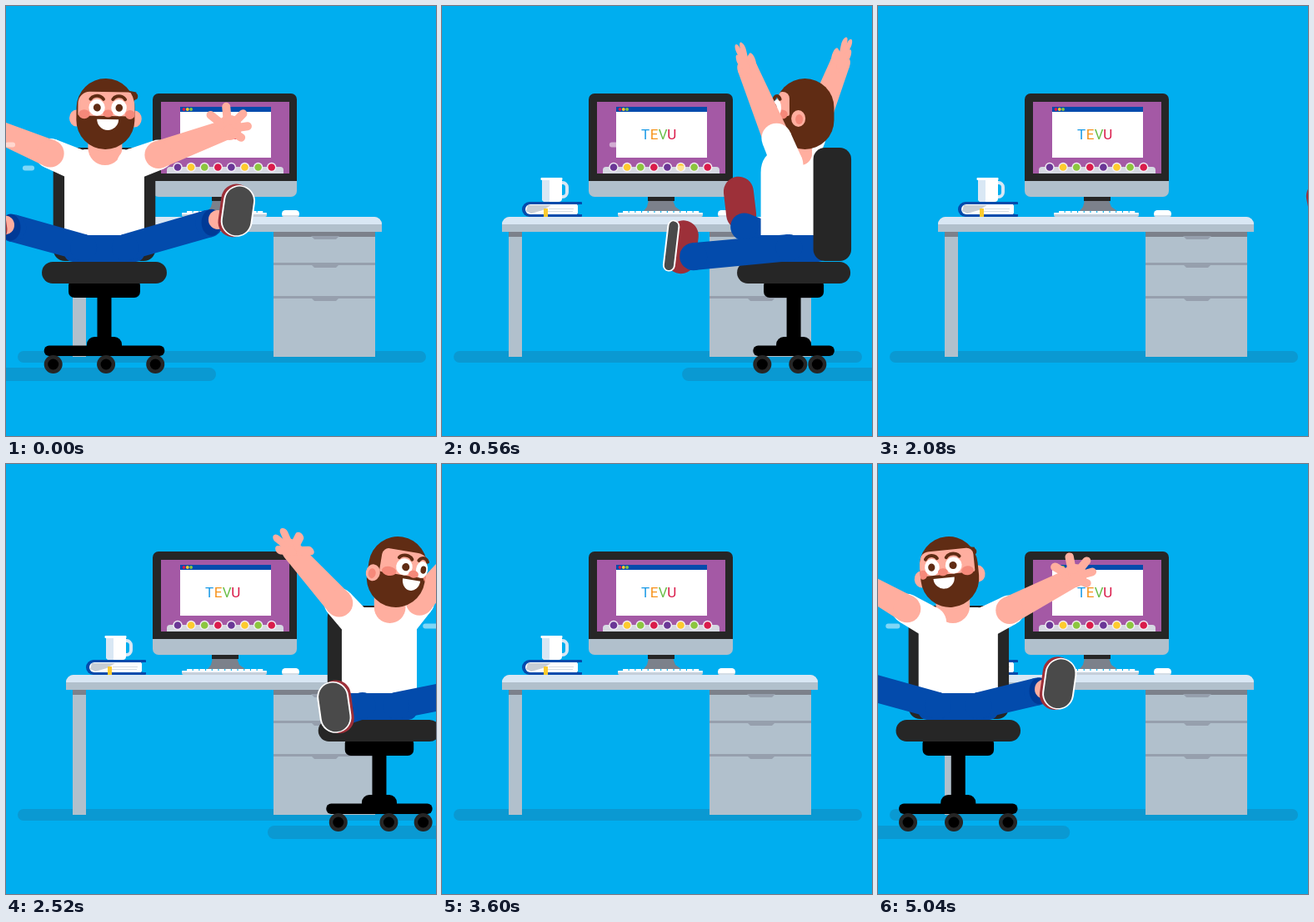
An HTML page with a canvas for the animation above (5080 ms loop, 516 by 516 pixels).

```html
<!DOCTYPE html>
<html lang="en">
<head>
<meta charset="utf-8">
<title>Spinning chair</title>
<style>
html, body { margin: 0; width: 100%; height: 100%; overflow: hidden; background: #00aeef; }
canvas { display: block; width: 100vw; height: 100vh; }
</style>
</head>
<body>
<canvas id="stage" width="516" height="516"></canvas>
<script>
const ctx = document.getElementById('stage').getContext('2d');
const LOOP = 5080, STEP = 40, SIZE = 516;
const SPEED = 0.543;   // px per ms
const SPIN = 0.45;     // degrees per ms
const RAD = Math.PI / 180;
const C = {
  sky: '#00aeef', shade: '#0a99d2', dark: '#262626', grey: '#b1c0cc', light: '#d9e7f4',
  line: '#969fad', under: '#7c818b', blue: '#034bac', navy: '#003a96', skin: '#ffae9f',
  pink: '#f5897a', hair: '#602c14', red: '#9d3039', sole: '#4a4a4a', purple: '#a459a5'
};
const clamp = (v, lo = 0, hi = 1) => Math.min(hi, Math.max(lo, v));
const mix = (p, q, k) => [p[0] + (q[0] - p[0]) * k, p[1] + (q[1] - p[1]) * k];

function box(x, y, w, h, color, r = 0) {
  ctx.fillStyle = color;
  ctx.beginPath();
  ctx.roundRect(x, y, w, h, r);
  ctx.fill();
}
function oval(x, y, rx, ry, color) {
  ctx.fillStyle = color;
  ctx.beginPath();
  ctx.ellipse(x, y, rx, ry, 0, 0, 7);
  ctx.fill();
}
const dot = (x, y, r, color) => oval(x, y, r, r, color);
function poly(points, color) {
  ctx.fillStyle = color;
  ctx.beginPath();
  points.forEach(p => ctx.lineTo(p[0], p[1]));
  ctx.fill();
}
function stroke(p, q, width, color) {
  ctx.strokeStyle = color;
  ctx.lineWidth = width;
  ctx.lineCap = 'round';
  ctx.beginPath();
  ctx.moveTo(p[0], p[1]);
  ctx.lineTo(q[0], q[1]);
  ctx.stroke();
}
// Limb with round ends of different radii
function tube(p, q, r1, r2, color) {
  const n = Math.atan2(q[1] - p[1], q[0] - p[0]) + Math.PI / 2;
  const at = (o, r) => [o[0] + Math.cos(n) * r, o[1] + Math.sin(n) * r];
  poly([at(p, r1), at(q, r2), at(q, -r2), at(p, -r1)], color);
  dot(p[0], p[1], r1, color);
  dot(q[0], q[1], r2, color);
}

function drawDesk() {
  box(14, 414, 490, 14, C.shade, 7);
  box(80, 271, 16, 150, C.grey);
  box(80, 271, 16, 6, C.under);
  box(321, 271, 122, 150, C.grey);
  box(321, 271, 122, 6, C.under);
  box(321, 308, 122, 3, C.line);
  box(321, 348, 122, 3, C.line);
  for (const y of [277, 311, 351]) {
    poly([[366, y - 1], [400, y - 1], [396, y + 3], [370, y + 3]], C.line);
  }
  box(72, 253, 379, 18, C.grey, [9, 9, 0, 0]);
  box(72, 253, 379, 9, C.light, [9, 9, 0, 0]);
}

function drawMonitor() {
  poly([[248, 233], [277, 233], [280, 241], [287, 246], [242, 246], [246, 241]], C.under);
  box(247, 229, 32, 5, C.dark);
  box(176, 105, 173, 106, C.dark, [7, 7, 0, 0]);
  box(176, 210, 173, 19, C.grey, [0, 0, 7, 7]);
  box(186, 115, 154, 86, C.purple);
  box(209, 121, 109, 61, '#fff');
  box(209, 121, 109, 6, C.blue);
  ['#da1c4b', '#fdcb2e', '#8cc63f'].forEach((c, i) => dot(213.5 + i * 4.3, 124, 1.9, c));

  ctx.font = '400 17px Roboto, Arial, sans-serif';
  ctx.textAlign = 'center';
  ctx.textBaseline = 'alphabetic';
  const inks = ['#1c9be6', '#f7941e', '#6cbf4b', '#da1c4b'];
  [...'TEVU'].forEach((ch, i) => {
    ctx.fillStyle = inks[i];
    ctx.fillText(ch, 244 + i * 10.6, 160);
  });

  box(193, 193, 140, 8, '#d6d9e2', [4, 4, 0, 0]);
  const icons = ['#6a3796', '#fdcb2e', '#8cc63f', '#da1c4b'];
  for (let i = 0; i < 8; i++) {
    dot(206 + i * 16.1, 193.5, 5.7, '#f3eef6');
    dot(206 + i * 16.1, 193.5, 4.3, icons[i % 4]);
  }
}

function drawDeskItems() {
  // Keyboard and mouse
  for (let i = 0; i < 12; i++) box(217 + i * 7.7, 246, 6.6, 3, '#fff');
  box(211, 248, 102, 5, '#c5cfda', 2);
  box(211, 248, 102, 2, '#f4f7fb', 1);
  box(331, 245, 21, 8, '#d4dde6', [8, 8, 3, 3]);
  box(331, 245, 21, 6, '#fff', [8, 8, 3, 3]);

  // Book
  box(96, 235, 72, 18, C.blue, [9, 1, 1, 9]);
  box(100, 238, 62, 12, '#fff', [6, 0, 0, 6]);
  box(160, 238, 9, 12, C.sky, [5, 0, 0, 5]);
  box(158, 238, 5, 12, '#fff', 2);
  poly([[103, 239], [131, 239], [121, 245], [107, 249], [101, 246]], '#c8ced5');
  box(128, 243, 30, 1, '#d4dbe3');
  box(122, 246, 35, 1, '#d4dbe3');
  box(122, 243, 5, 10, '#fdcb2e');

  // Mug
  ctx.strokeStyle = C.light;
  ctx.lineWidth = 4;
  ctx.beginPath();
  ctx.roundRect(139, 212, 11, 17, 6);
  ctx.stroke();
  box(120, 206, 24, 29, '#fff', [1, 1, 4, 4]);
  box(120, 209, 9, 26, C.light, [0, 0, 0, 4]);
  box(118.5, 206, 26, 3, '#fff', 1);
}

function drawBase(cos, sin) {
  const c = Math.abs(cos);
  const arm = 47.5 + 25 * cos * cos;
  const block = 34 + 9 * c;
  box(-8.5, 345, 17, 60, '#000');
  box(-21, 397, 42, 16, '#000', [9, 9, 0, 0]);
  box(-arm, 407.5, arm * 2, 12.5, '#000', 6);
  for (const x of [11 - arm, 24 * sin * cos, arm - 11 - 10 * sin * sin]) {
    dot(x, 430, 11, C.dark);
    dot(x, 430, 6.5, '#000');
  }
  box(-block, 328, block * 2, 22, '#000', 7);
}
function drawSeat(cos) {
  const half = 66 + 9 * Math.abs(cos);
  box(-half, 307, half * 2, 26, C.dark, 13);
}
function drawChairBack(cos, sin) {
  const half = 11.5 + 50 * Math.abs(cos);
  box(-50 * sin ** 3 - half, 170, half * 2, 136, C.dark, 14);
}

function drawTorso(cos, sin, lean) {
  const w = Math.hypot(48 * cos, 39 * sin);
  box(-w, 270, w * 2, 37, C.blue, 10);
  ctx.fillStyle = '#fff';
  ctx.beginPath();
  ctx.moveTo(-w, 275);
  ctx.lineTo(-w, 200);
  ctx.quadraticCurveTo(-w, 178, -0.5 * w, 172);
  ctx.lineTo(0.5 * w, 172);
  ctx.quadraticCurveTo(w, 178, w, 200);
  ctx.lineTo(w, 275);
  ctx.fill();
  const neck = 12 + 8.5 * Math.abs(cos);
  box(lean * 0.6 - neck, 150, neck * 2, cos > -0.5 ? 41 : 24, C.skin, [0, 0, neck, neck]);
}

function drawArm(side, a, cos) {
  const c = Math.cos((a - 9) * RAD);
  const hand = [149 * c * side, 62 + 86 * c * c - (side > 0 ? 0 : 6)];
  const shoulder = [34 * cos * side, 190];
  const elbow = mix(shoulder, hand, 0.27);
  const sleeve = () => tube(shoulder, elbow, 19, 18, '#fff');
  if (cos > 0) sleeve();
  tube(elbow, hand, 16.5, 12, C.skin);
  if (cos <= 0) sleeve();

  // The hand turns edge-on as the arm swings past the viewer
  const turn = Math.max(0.3, Math.abs(c));
  const right = hand[0] >= shoulder[0] ? 1 : -1;
  ctx.save();
  ctx.translate(hand[0], hand[1]);
  ctx.rotate(Math.atan2(hand[1] - elbow[1], hand[0] - elbow[0]));
  ctx.scale(1, right * turn);
  oval(2, -1, 15, 15, C.skin);
  for (const tip of [[-14, -23], [7, -26], [23, -11], [23, 5], [11, 15]]) {
    stroke([0, 0], tip, 10 / Math.sqrt(turn), C.skin);
  }
  ctx.restore();
}

function legPose(side, cos, sin) {
  const back = Math.max(0, -cos);
  const fx = side * (150 + 18 * back);
  const fz = 114 * (1 - 0.75 * back ** 1.5);
  const x = fx * cos + fz * sin;
  const depth = fz * cos - fx * sin;
  const near = clamp(depth / 179);
  const foot = [x, 237 + 50 * near ** 3 + 38 * Math.max(0, -sin) ** 4 * clamp(depth / 100)];
  const ankle = [x * (0.79 + 0.1 * clamp(back * 4)), foot[1] + 28 - 23 * near];
  return { side, depth, foot, ankle, hip: [side * 25 * cos, 290] };
}
function drawShoe({ side, depth, foot }, cos) {
  const out = Math.sign(foot[0]) || 1;
  const soleW = depth > 0 ? 34 * clamp(0.55 + cos) : 0;
  ctx.save();
  ctx.translate(foot[0], foot[1]);
  ctx.rotate(side * (8 - 40 * clamp((-cos - 0.2) / 0.8)) * RAD);
  box(-18 - out * 3, -32, 36, 64, C.red, 18);
  if (soleW > 3) {
    const x = out * (1 + (34 - soleW) * 0.4);
    box(x - soleW / 2 - 2, -31, soleW + 4, 62, '#fff', soleW / 2 + 2);
    box(x - soleW / 2, -29.5, soleW, 59, C.sole, soleW / 2);
  }
  ctx.restore();
}
function drawLeg(leg, cos) {
  const { foot, ankle, hip } = leg;
  if (cos < 0) drawShoe(leg, cos);
  tube(hip, ankle, 16, 16.5, C.blue);
  if (cos > 0.3) {
    const cuff = mix(ankle, foot, 0.08), skin = mix(ankle, foot, 0.3);
    oval(cuff[0], cuff[1], 12, 16, C.navy);
    oval(skin[0], skin[1], 11, 11.5, C.skin);
  }
  if (cos >= 0) drawShoe(leg, cos);
}

function drawHead(a, cos, lean) {
  const face = ((a + 180) % 360 + 360) % 360 - 180;
  const at = deg => Math.sin((a + deg) * RAD);
  const facing = deg => Math.cos((a + deg) * RAD);
  ctx.save();
  ctx.translate(lean, 129);
  ctx.rotate(0.55 * lean * Math.max(0, cos) * RAD);

  const ear = deg => {
    oval(35 * at(deg), 6, 8.5, 10, C.skin);
    if (facing(deg) > 0.5) oval(35 * at(deg) + 1, 7, 4.5, 6, C.pink);
  };
  for (const deg of [-90, 90]) if (facing(deg) <= 0.5 && facing(deg) > -0.5) ear(deg);
  if (facing(75) > -0.7) {
    const x = 34 * at(75);
    poly([[x - 8, -28], [x + 3, -26], [x + 4, -19], [x - 4, -12]], C.hair);
    dot(x + 1, -21, 4, C.hair);
  }
  // Seen from behind, the jaw shows below the hair
  const jaw = 6 * clamp(-cos * 2 - 0.6);
  if (jaw > 0) box(-33, -10, 66, 53, C.skin, 32);
  box(-35, -42, 70, 85 - jaw, C.hair, 35);

  ctx.save();
  ctx.beginPath();
  ctx.roundRect(-35, -42, 70, 85, 35);
  ctx.clip();
  const l = Math.max(face - 72, -90), r = Math.min(face + 72, 90);
  if (l < r) {
    const x0 = 36 * Math.sin(l * RAD), x1 = 36 * Math.sin(r * RAD);
    box(x0, -26, x1 - x0, 29, C.skin, [Math.min(14, (x1 - x0) / 2), 8, 2, 2]);
    for (const deg of [-52, 52]) {
      if (facing(deg) > 0) oval(35 * at(deg), 1, 7 * facing(deg) + 2, 5.5, C.pink);
    }
  }
  ctx.restore();

  for (const deg of [-23, 23]) {
    const f = facing(deg), x = 34 * at(deg);
    if (f <= 0) continue;
    oval(x, -7, 4 + 6 * f, 10, '#fff');
    oval(x + 3 * at(0), -7, 2 + 2.6 * f, 4.6, C.hair);
    ctx.strokeStyle = C.hair;
    ctx.lineWidth = 4;
    ctx.lineCap = 'round';
    ctx.beginPath();
    ctx.ellipse(x, -14, 3 + 6 * f, 7, 0, 1.15 * Math.PI, 1.85 * Math.PI);
    ctx.stroke();
  }
  if (cos > 0) {
    oval(34 * at(0), 0, 6, 4.5, C.pink);
    ctx.fillStyle = '#fff';
    ctx.beginPath();
    ctx.ellipse(32 * at(0), 7, 12 * cos + 1, 13, 0, 0, Math.PI);
    ctx.fill();
  }
  for (const deg of [-90, 90]) if (facing(deg) > 0.5) ear(deg);
  ctx.restore();
}

// Streaks left behind by the ride: height, start, end, position at time zero, speed
const STREAKS = [
  [166.5, -100, 650, 5, 0.36],
  [194.5, -400, 90, 27, 0.23],
  [194.5, 285, 600, 219, 0.12],
  [252, 325, 550, 225, 0.12]
];
function drawStreaks(s) {
  for (const [y, from, to, x0, v] of STREAKS) {
    if (s <= from || s >= to) continue;
    const w = 6 + 15 * Math.sin(Math.PI * (s - from) / (to - from));
    box(x0 + v * s - w / 2, y - 3, w, 6, 'rgba(255,255,255,.5)', 3);
  }
}

// One ride from left to right; s = 0 is when the man faces the viewer
function drawRide(s) {
  const a = 5 + SPIN * s;
  const cos = Math.cos(a * RAD), sin = Math.sin(a * RAD);
  const lean = 40 * sin * cos + 1.5 - 3.5 * clamp(cos * 4, -1, 1);
  const legs = [-1, 1].map(side => legPose(side, cos, sin)).sort((p, q) => p.depth - q.depth);
  const isFar = side => side * sin > 0.5;
  const arms = far => [-1, 1].forEach(side => {
    if (isFar(side) === far) drawArm(side, a, cos);
  });

  ctx.save();
  ctx.translate(118 + SPEED * s, 0);
  box(-134, 434, 268, 16, C.shade, 8);
  if (cos >= 0) drawChairBack(cos, sin);
  legs.filter(leg => leg.depth < 0).forEach(leg => drawLeg(leg, cos));
  arms(true);
  drawBase(cos, sin);
  drawTorso(cos, sin, lean);
  drawSeat(cos);
  drawHead(a, cos, lean);
  arms(false);
  legs.filter(leg => leg.depth >= 0).forEach(leg => drawLeg(leg, cos));
  if (cos < 0) drawChairBack(cos, sin);
  ctx.restore();
  drawStreaks(s);
}

function draw(time) {
  const t = Math.floor(time % LOOP / STEP) * STEP;
  ctx.fillStyle = C.sky;
  ctx.fillRect(0, 0, SIZE, SIZE);
  drawDesk();
  drawMonitor();
  drawDeskItems();
  if (t < 1000) drawRide(t);
  else if (t >= 4520) drawRide(t - LOOP);
  else if (t >= 2080 && t < 3600) {
    ctx.save();
    ctx.translate(SIZE, 0);
    ctx.scale(-1, 1);
    drawRide(t - 2612);
    ctx.restore();
  }
}

const start = performance.now();
function tick() {
  draw(performance.now() - start);
  requestAnimationFrame(tick);
}
tick();
</script>
</body>
</html>
```
